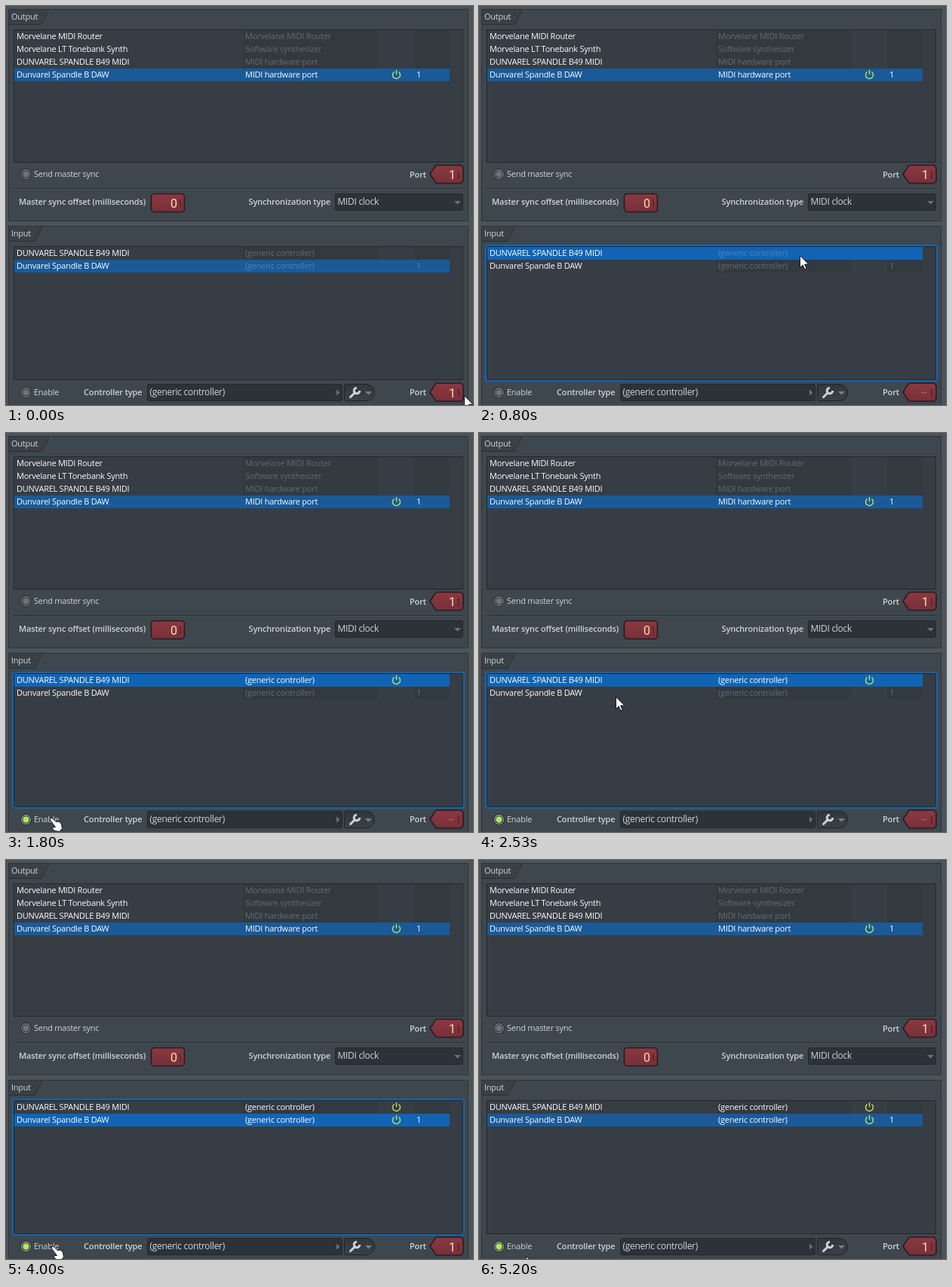
Recreate the animation shown at these times as an HTML page with a canvas. Size 619 px wide and 530 px high, loop 5.4 s.

```html
<!DOCTYPE html>
<html lang="en">
<head>
<meta charset="utf-8">
<title>MIDI settings</title>
<style>
html, body { margin: 0; width: 100%; height: 100%; overflow: hidden; background: #4a545a; }
canvas { display: block; }
</style>
</head>
<body>
<canvas id="stage" width="619" height="530"></canvas>
<script>
const ctx = document.getElementById('stage').getContext('2d');
const LOOP = 5400, STEP = 1000 / 15;
const WHITE = '#fafcfd', LABEL = '#ccd4d9', DIM = '#636b71', LIME = '#c6ee55';

const OUTPUTS = [
  ['Morvelane MIDI Router', 'Morvelane MIDI Router'],
  ['Morvelane LT Tonebank Synth', 'Software synthesizer'],
  ['DUNVAREL SPANDLE B49 MIDI', 'MIDI hardware port'],
  ['Dunvarel Spandle B DAW', 'MIDI hardware port', '1']
];
const INPUTS = [
  ['DUNVAREL SPANDLE B49 MIDI', '(generic controller)'],
  ['Dunvarel Spandle B DAW', '(generic controller)', '1']
];

// Pointer path: time, x, y and the easing used to reach that point
const smooth = p => p * p * (3 - 2 * p);
const easeOut = p => 1 - (1 - p) * (1 - p);
const linear = p => p;
const PATH = [
  [0, 607, 517], [530, 425, 331, smooth], [800, 425, 331], [1200, 90, 480, smooth],
  [1470, 58, 511, easeOut], [1800, 58, 511], [2330, 175, 366, smooth],
  [2530, 181, 350, easeOut], [2800, 181, 350], [3000, 111, 407, linear],
  [3400, 63, 497, easeOut], [3670, 60, 513, easeOut], [4000, 60, 513],
  [4135, 50, 519, linear], [4270, 62, 526, easeOut], [LOOP, 62, 526]
];

function pointerAt(t) {
  const i = Math.max(1, PATH.findIndex(k => k[0] >= t));
  const a = PATH[i - 1], b = PATH[i];
  const p = (b[3] || linear)((t - a[0]) / (b[0] - a[0]));
  return [Math.round(a[1] + (b[1] - a[1]) * p), Math.round(a[2] + (b[2] - a[2]) * p)];
}

function rect(x, y, w, h, fill) {
  ctx.fillStyle = fill;
  ctx.fillRect(x, y, w, h);
}

function shape(points, fill, stroke, width = 1) {
  ctx.beginPath();
  points.forEach(([x, y]) => ctx.lineTo(x, y));
  ctx.closePath();
  ctx.fillStyle = fill;
  ctx.fill();
  if (!stroke) return;
  ctx.lineWidth = width;
  ctx.strokeStyle = stroke;
  ctx.stroke();
}

function disc(x, y, r, fill) {
  ctx.beginPath();
  ctx.arc(x, y, r, 0, Math.PI * 2);
  ctx.fillStyle = fill;
  ctx.fill();
}

function box(x, y, w, h, radii, fill, stroke, width = 1) {
  ctx.beginPath();
  ctx.roundRect(x, y, w, h, radii);
  ctx.lineWidth = width;
  if (fill) { ctx.fillStyle = fill; ctx.fill(); }
  if (stroke) { ctx.strokeStyle = stroke; ctx.stroke(); }
}

function fade(y, h, top, bottom) {
  const g = ctx.createLinearGradient(0, y, 0, y + h);
  g.addColorStop(0, top);
  g.addColorStop(1, bottom);
  return g;
}

function text(str, x, y, color, font = '400 11px', spacing = -.25) {
  ctx.font = font + ' "Open Sans", "Noto Sans", sans-serif';
  ctx.letterSpacing = spacing + 'px';
  ctx.fillStyle = color;
  ctx.fillText(str, x, y);
}

function label(str, x, y) {
  text(str, x, y, LABEL, '600 11px', -.15);
}

function digits(str, x, y) {
  ctx.font = '400 16px Roboto, "Open Sans", sans-serif';
  ctx.letterSpacing = '0px';
  ctx.fillStyle = '#ffdca6';
  ctx.textAlign = 'right';
  ctx.fillText(str, x, y);
  ctx.textAlign = 'left';
}

function panel(y, h, title, slant) {
  rect(3, y, 610, h, '#3e474d');
  ctx.strokeStyle = '#2d3439';
  ctx.lineWidth = 1;
  ctx.strokeRect(3.5, y + .5, 609, h);
  shape([[4, y + 1], [slant, y + 1], [slant - 10, y + 20], [4, y + 20]], '#394147');
  ctx.beginPath();
  ctx.moveTo(4, y + 20.5);
  ctx.lineTo(slant - 10, y + 20.5);
  ctx.lineTo(slant, y + 1);
  ctx.strokeStyle = '#282e33';
  ctx.stroke();
  text(title, 7, y + 14, LABEL);
}

function power(x, y) {
  ctx.strokeStyle = LIME;
  ctx.lineWidth = 1.3;
  ctx.beginPath();
  ctx.arc(x, y + .5, 5, -Math.PI * .3, Math.PI * 1.3);
  ctx.moveTo(x, y - 6);
  ctx.lineTo(x, y);
  ctx.stroke();
}

function list(y, h, rows, selected, enabled, focused) {
  rect(10, y, 596, h, '#363d44');
  ctx.strokeStyle = '#23292e';
  ctx.lineWidth = 1;
  ctx.strokeRect(10.5, y + .5, 595, h - 1);
  rows.forEach(([name, kind, port], i) => {
    const top = y + 1 + i * 17, base = top + 12, on = enabled[i];
    if (i === selected) {
      rect(11, top, 577, 17, focused ? '#1164b4' : '#1a5a99');
    } else {
      rect(314, top, 179, 17, 'rgba(0,0,0,.07)');
      rect(541, top, 47, 17, 'rgba(0,0,0,.07)');
    }
    const color = on ? WHITE : i === selected ? '#4d84b6' : DIM;
    text(name, 14, base, WHITE);
    text(kind, 317, base, color);
    if (port) text(port, 544, base, color);
    if (on) power(517.5, top + 8);
  });
  if (focused) box(9, y - 1, 598, h + 2, 3, null, '#1464b4', 2);
}

function radio(x, y, on) {
  disc(x, y, 7.5, '#23282c');
  disc(x, y, 6.4, on ? '#aebba6' : '#878f94');
  disc(x, y, 5.3, '#23282c');
  disc(x, y, 4.2, on ? '#b0e860' : '#6c747a');
}

function grip(x, y) {
  ctx.beginPath();
  ctx.moveTo(x + 1, y - 5);
  ctx.bezierCurveTo(x - 3, y - 1, x + 4, y + 1, x, y + 5);
  ctx.strokeStyle = '#561f27';
  ctx.lineWidth = 1.3;
  ctx.stroke();
}

function portTag(y, value) {
  label('Port', 535, y + 4);
  shape([[562, y], [570, y - 12], [603, y - 12], [606, y - 9], [606, y + 9], [603, y + 12], [570, y + 12]],
    fade(y - 12, 24, '#8c3840', '#76303a'), '#2a1b20', 1.6);
  if (value) digits(value, 596, y + 6.5);
  else text('···', 586, y + 4, '#d9a185');
  grip(599.5, y + 1);
}

function dropdown(x, y, w, value) {
  box(x + .5, y + .5, w - 1, 22, 2, '#2d3238', '#23282d');
  text(value, x + 3.5, y + 15, LABEL, '400 12px', -.3);
}

function wrench(x, y) {
  ctx.strokeStyle = '#cbd2d6';
  ctx.lineWidth = 3;
  ctx.lineCap = 'round';
  ctx.beginPath();
  ctx.moveTo(x - 6, y + 6);
  ctx.lineTo(x, y);
  ctx.stroke();
  ctx.lineCap = 'butt';
  ctx.beginPath();
  ctx.arc(x + 2.5, y - 2.5, 3.8, 0, Math.PI * 1.5);
  ctx.stroke();
}

function pointer(x, y) {
  const hand = x > 17 && x < 72 && y > 502 && y < 524;
  ctx.save();
  ctx.translate(x + .5, y + .5);
  const outline = hand
    ? [[0, 0], [2.5, 0], [8, 5], [12, 4.5], [15, 8], [16, 14], [12, 18], [6, 17], [3, 14], [4, 12], [7, 12], [0, 2.5]]
    : [[0, 0], [0, 16], [3.7, 12.5], [6.3, 18.3], [8.6, 17.3], [6.1, 11.6], [11.3, 11.6]];
  ctx.lineJoin = 'round';
  shape(outline, '#fff', '#15181a');
  ctx.restore();
}

function drawOutput() {
  panel(4, 281, 'Output', 57);
  list(31, 177, OUTPUTS, 3, [false, false, false, true], false);
  radio(26.5, 223.5, false);
  text('Send master sync', 37, 227, LABEL);
  portTag(223.5, '1');
  rect(10, 242, 596, 1, '#2a3035');
  rect(10, 243, 596, 1, '#475157');
  label('Master sync offset (milliseconds)', 17, 264);
  box(192.5, 249.5, 44, 24, 4, fade(249, 25, '#8c3840', '#76303a'), '#2a1b20', 1.6);
  digits('0', 227, 268);
  grip(230.5, 262);
  label('Synchronization type', 321.5, 264);
  dropdown(436, 249, 170, 'MIDI clock');
  shape([[594, 259], [603, 259], [598.5, 263.5]], '#697177');
}

function drawInput(t) {
  const selected = t >= 670 && t < 2670 ? 0 : 1;
  const enabled = [t >= 1600, t >= 3800];
  const focused = t >= 670 && t < 4870;
  panel(292, 240, 'Input', 48);
  list(319, 178, INPUTS, selected, enabled, focused);
  radio(26.5, 513.5, enabled[selected]);
  text('Enable', 37, 517, LABEL);
  label('Controller type', 103, 517);
  dropdown(187, 502, 259, '(generic controller)');
  shape([[438, 509.5], [442.5, 513.5], [438, 517.5]], '#697177');
  box(448.5, 502.5, 40, 22, [2, 11, 11, 2], fade(502, 23, '#30363c', '#3a4147'), '#1e2327');
  wrench(462.5, 513.5);
  shape([[476, 512], [485, 512], [480.5, 516.5]], '#788086');
  portTag(513, selected ? '1' : '');
}

function render(now) {
  // Screen updates happen fifteen times a second
  const t = Math.floor((now % LOOP + 5) / STEP) * STEP;
  rect(0, 0, 619, 530, '#4a545a');
  drawOutput();
  drawInput(t + 5);
  pointer(...pointerAt(Math.min(t, LOOP)));
}

function tick() {
  render(performance.now());
  requestAnimationFrame(tick);
}
tick();
</script>
</body>
</html>
```
